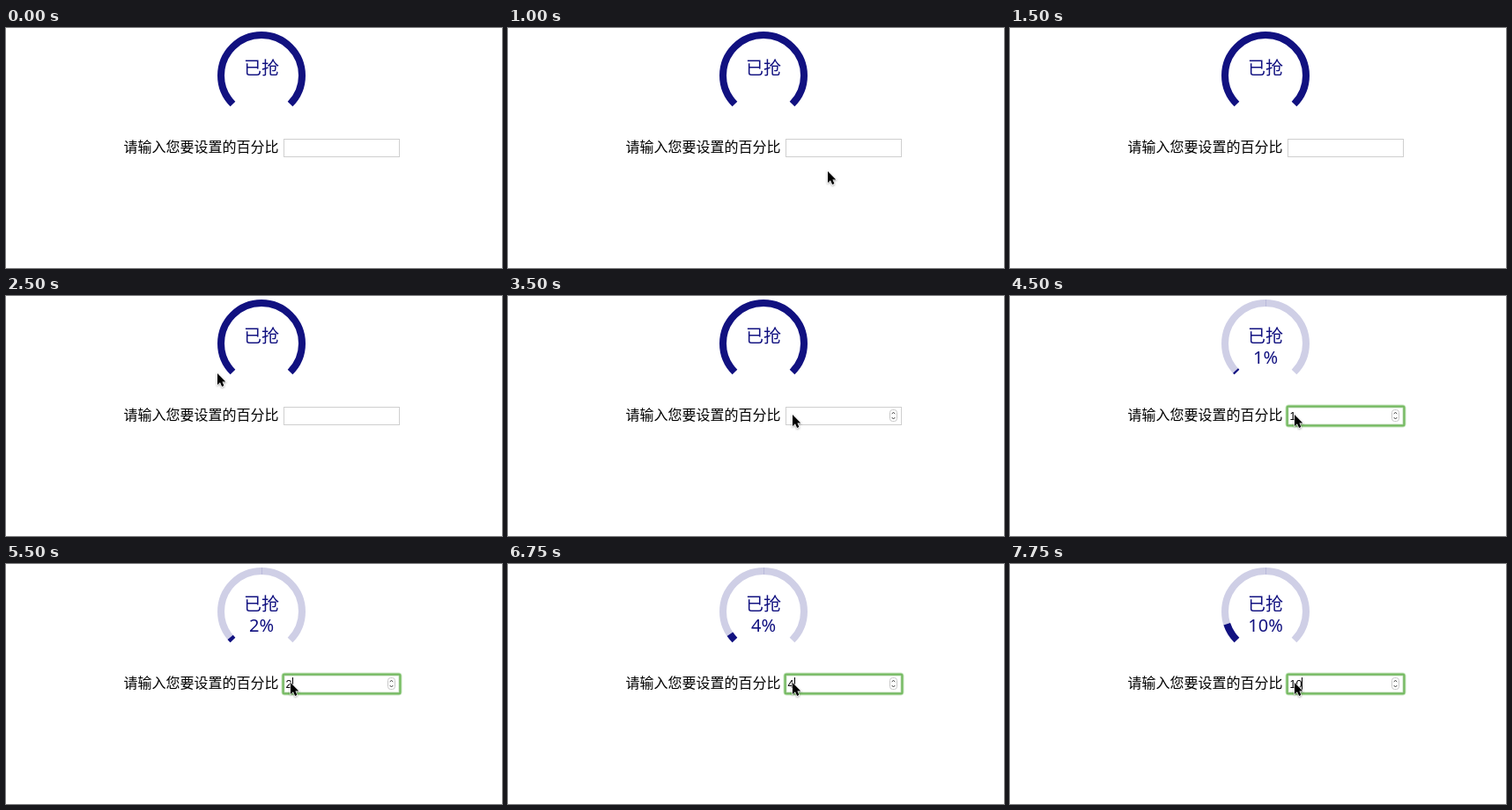
An HTML page for the animation above (8 s loop, 563 px wide and 273 px high).

```html
<!DOCTYPE html>
<html lang="zh-CN">
<head>
<meta charset="utf-8">
<style>
  html, body { margin: 0; width: 100%; height: 100%; overflow: hidden; background: #fff; }
  svg { display: block; }
  text { font-family: "Noto Sans", "Noto Sans CJK SC", sans-serif; white-space: pre; }
  .dial { fill: none; stroke: #111180; stroke-width: 8; }
  .dialText { font-size: 20px; fill: #111180; text-anchor: middle; }
  #pointer { filter: drop-shadow(0 1px 1px rgba(0, 0, 0, .35)); }
  #menu rect { filter: drop-shadow(0 1px 1.5px rgba(0, 0, 0, .4)); }
</style>
</head>
<body>
<svg width="563" height="273" viewBox="0 0 563 273">
  <g id="track">
    <path class="dial" opacity=".2" d="M257.47 86.53A46 46 0 1 1 322.53 86.53"/>
    <path d="M290.5 4v8" stroke="#111180" opacity=".1"/>
  </g>
  <path id="arc" class="dial" pathLength="100" d="M257.47 86.53A46 46 0 1 1 322.53 86.53"/>
  <text class="dialText" x="290" y="53">已抢</text>
  <text class="dialText" id="percent" x="290" y="77"></text>

  <text x="133.5" y="141" font-size="16" style="font-family:'Noto Sans CJK SC',sans-serif">请输入您要设置的百分比</text>
  <rect x="315.5" y="126.5" width="131" height="20" fill="#fff" stroke="#cfcfcf"/>
  <g id="ring" fill="none" stroke="#74bb60">
    <rect x="314.5" y="125.5" width="133" height="22" rx="2" stroke-width="4" opacity=".4"/>
    <rect x="314.5" y="125.5" width="133" height="22" rx="1.5" stroke-width="2"/>
  </g>
  <g id="spinner" fill="none">
    <rect x="433.5" y="129.5" width="8" height="13" rx="3" fill="#fff" stroke="#c8c8c8"/>
    <path d="M435.7 134.2l1.8-2 1.8 2M435.7 138l1.8 2 1.8-2" stroke="#444"/>
  </g>
  <text id="value" x="317.5" y="141" font-size="12.5" style="font-family:'Liberation Sans',Arial,sans-serif"></text>
  <rect id="caret" y="129" width="1" height="15"/>

  <g id="menu">
    <rect x="314" y="148" width="192" height="52" rx="3" fill="#fff"/>
    <text x="325.5" y="179" font-size="13" font-weight="600">1</text>
  </g>
  <path id="pointer" d="M0 0V13L3 10.3 5.1 15.1 7.4 14.1 5.4 9.4H9.3Z" stroke="#fff" stroke-width="1.2" paint-order="stroke"/>
</svg>
<script>
const LOOP = 8000;
const el = id => document.getElementById(id);
const show = (id, on) => el(id).style.display = on ? '' : 'none';

// Each cue changes part of the state from its time on.
const cues = [
  [0, { pointer: null, hover: false, focus: false, menu: false, caret: false, value: '', percent: null }],
  [250, { pointer: [273, 101] }],
  [500, { pointer: [275, 101] }],
  [750, { pointer: [445, 236] }],
  [1000, { pointer: [363, 163] }],
  [1250, { pointer: [358, 150] }],
  [1500, { pointer: null }],
  [2500, { pointer: [240, 88] }],
  [2750, { pointer: [296, 123] }],
  [3000, { pointer: [319, 132] }],
  [3250, { pointer: [322, 133] }],
  [3500, { pointer: [323, 135], hover: true }],
  [3750, { focus: true, menu: true, caret: true }],
  [4250, { caret: false }],
  [4500, { menu: false, value: '1', percent: 1 }],
  [5000, { value: '' }],
  [5500, { value: '2', percent: 2, caret: true }],
  [6000, { value: '3', percent: 3 }],
  [6500, { value: '', caret: false }],
  [6750, { value: '4', percent: 4, caret: true }],
  [7000, { value: '' }],
  [7250, { caret: false }],
  [7500, { value: '1', percent: 1, caret: true }],
  [7750, { value: '10', percent: 10 }]
];

function draw(now) {
  const t = now % LOOP;
  const s = Object.assign({}, ...cues.filter(([at]) => at <= t).map(([, change]) => change));
  const isSet = s.percent !== null;

  show('track', isSet);
  el('arc').setAttribute('stroke-dasharray', isSet ? `${s.percent} 200` : 'none');
  el('percent').textContent = isSet ? s.percent + '%' : '';

  show('ring', s.focus);
  show('spinner', s.hover);
  show('menu', s.menu);
  show('caret', s.caret);
  el('value').textContent = s.value;
  el('caret').setAttribute('x', Math.round(318 + 6.7 * s.value.length));

  show('pointer', s.pointer);
  if (s.pointer) el('pointer').setAttribute('transform', `translate(${s.pointer})`);
  requestAnimationFrame(draw);
}
requestAnimationFrame(draw);
</script>
</body>
</html>
```
